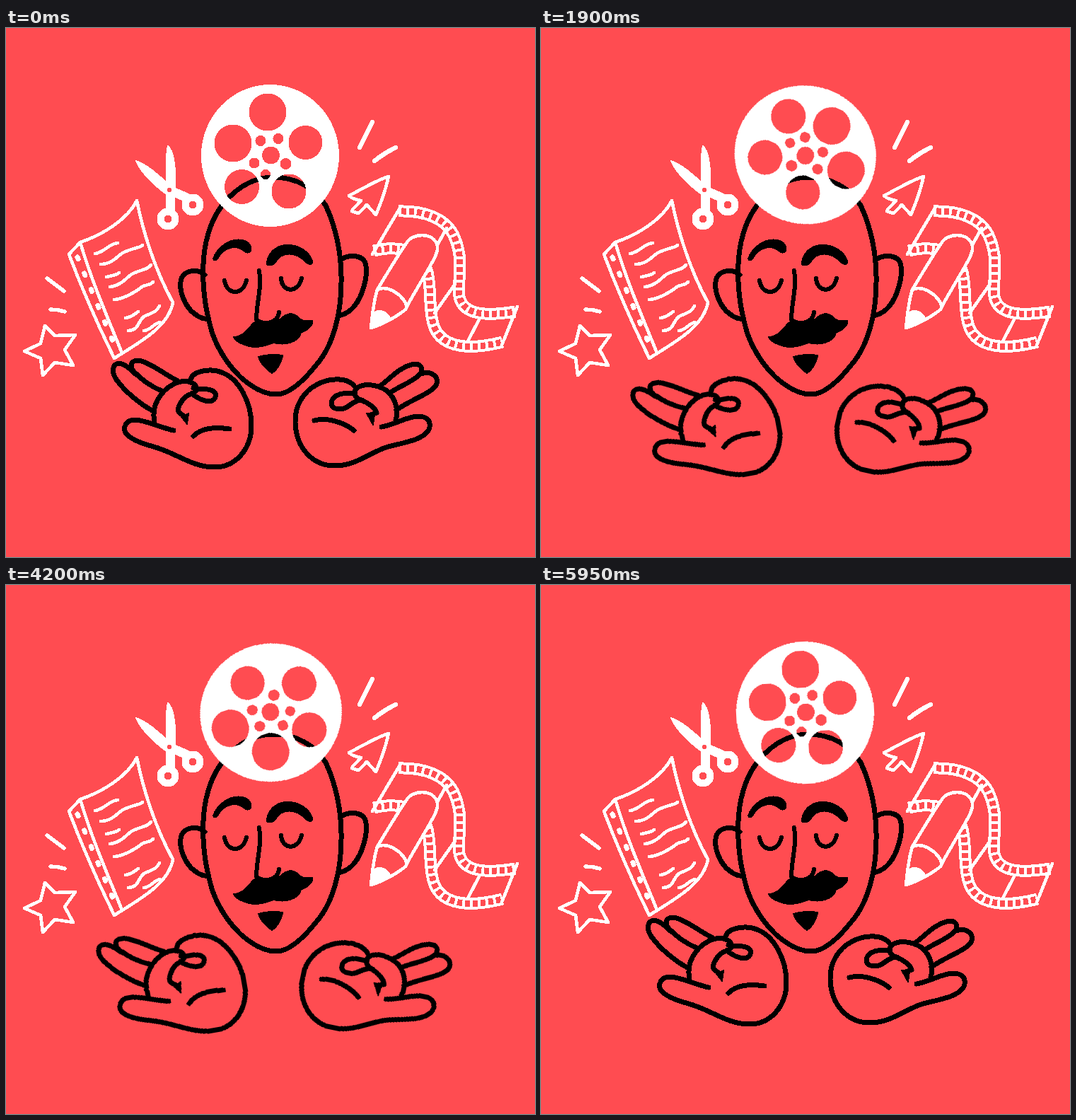
Write an HTML page that moves like this. It is 748x748 px and loops after 6000 ms.

```html
<!DOCTYPE html>
<html lang="en">
<head>
<meta charset="utf-8">
<title>Film maker in meditation</title>
<style>
  :root { --red: #ff4c51; --loop: 6000ms; }
  html, body { margin: 0; width: 100%; height: 100%; overflow: hidden; background: var(--red); }
  svg { display: block; width: 100vw; height: 100vh; shape-rendering: crispEdges; }

  .ink, .chalk { fill: none; stroke-linecap: round; stroke-linejoin: round; }
  .ink { stroke: #000; stroke-width: 7; }
  .chalk { stroke: #fff; stroke-width: 4.6; }
  .black { fill: #000; stroke-width: 2; }
  .white { fill: #fff; stroke-width: 2; }
  .red { fill: var(--red); }

  .band use { stroke-linecap: butt; }
  .band .edge { stroke: #fff; stroke-width: 17; }
  .band .gap { stroke: var(--red); stroke-width: 9; }
  .band .bars { stroke: #fff; stroke-width: 15; stroke-dasharray: 4 7; }

  .reel { transform-origin: 374px 180px; animation: spin var(--loop) steps(120) infinite; }
  .left, .right { animation: var(--loop) cubic-bezier(.33, 0, .67, 1) infinite; }
  .left { transform-origin: 233px 560px; animation-name: sink-left; }
  .right { transform-origin: 532px 552px; animation-name: sink-right; }

  @keyframes spin { to { transform: rotate(360deg); } }
  @keyframes sink-left {
    0%, 18.33%, 82.5%, 100% { transform: translate(0, 0) rotate(0deg); }
    34.17%, 66.67% { transform: translate(-9.5px, 23px) rotate(-11.2deg); }
  }
  @keyframes sink-right {
    0%, 18.33%, 82.5%, 100% { transform: translate(0, 0) rotate(0deg); }
    34.17%, 66.67% { transform: translate(10px, 25px) rotate(13.3deg); }
  }
</style>
</head>
<body>
<svg viewBox="0 0 748 748">
  <defs>
    <path id="upper" d="M555 259C590 258 624 268 635 298C646 325 641 350 640 370C640 404 670 409 720 401"/>
    <path id="lower" d="M520 315C550 308 585 310 596 345C602 370 597 400 606 424C618 452 655 456 702 444"/>
    <mask id="holes" maskUnits="userSpaceOnUse" x="260" y="70" width="230" height="230">
      <rect x="260" y="70" width="230" height="230" fill="#fff"/>
      <circle cx="370" cy="119" r="26.5"/>
      <circle cx="423.5" cy="162" r="24"/>
      <circle cx="400" cy="231" r="24.5"/>
      <circle cx="333.5" cy="224.5" r="24.5"/>
      <circle cx="321" cy="163" r="26.5"/>
      <circle cx="374.5" cy="180" r="12.5"/>
      <circle cx="360" cy="159.5" r="7.5"/>
      <circle cx="385" cy="156.5" r="7.5"/>
      <circle cx="395.5" cy="192" r="8"/>
      <circle cx="367" cy="207" r="7"/>
      <circle cx="351" cy="191" r="7.5"/>
    </mask>
  </defs>

  <rect class="red" width="748" height="748"/>

  <!-- face -->
  <g class="ink">
    <path d="M378 211C340 211 296 242 283 302C275 340 279 385 288 418C294 447 313 476 332 494C350 510 366 518 382 518C400 518 420 500 439 476C462 450 474 405 474 360C475 320 466 280 452 251C438 228 412 211 378 211Z"/>
    <path d="M281 349C272 341 254 341 248 354C243 372 254 396 268 405C276 411 281 412 286 411"/>
    <path d="M473 328C482 321 502 319 508 332C513 350 504 380 492 394C486 401 480 404 474 406"/>
    <path d="M309 357C312 378 335 379 340 357M389 354C390 374 413 376 418 354" stroke-width="6"/>
    <path d="M358 343C362 368 354 390 354 412C362 421 385 418 386 402" stroke-width="6"/>
    <g class="black">
      <path d="M293 326C300 308 318 297 334 300C344 302 348 309 346 315C344 319 339 318 335 314C325 307 312 310 303 320C299 328 294 331 293 326Z"/>
      <path d="M369 331C371 318 382 307 398 307C415 307 428 316 433 329C434 336 428 335 424 331C414 320 400 316 388 323C382 328 380 335 375 335C371 336 368 335 369 331Z"/>
      <path d="M322 437C332 437 340 430 348 419C354 412 362 414 372 418C380 418 386 414 392 408C400 403 408 403 414 410C420 416 426 414 433 414C434 421 426 427 417 431C413 445 395 449 378 445C366 450 352 453 340 449C332 446 324 443 322 437Z"/>
      <path d="M357 465C366 462 380 461 391 463C390 472 383 484 376 488C369 484 360 474 357 465Z"/>
    </g>
  </g>

  <!-- hands -->
  <g class="ink left">
    <path d="M261 497C265 484 290 481 305 487C330 496 347 530 347 562C347 595 325 621 295 621C265 621 245 604 215 594C195 588 180 584 170 574C164 565 170 554 182 554C200 555 218 565 237 569"/>
    <path d="M207 541C190 532 168 514 156 497C146 481 154 472 164 475C172 478 178 484 184 490"/>
    <path d="M222 514C205 507 190 496 180 485C172 473 182 468 192 471C210 477 226 491 243 499"/>
    <path d="M210 556C205 535 218 513 238 503C250 497 264 499 269 507C272 515 262 517 256 520C248 526 242 536 244 543L252 549"/>
    <path d="M265 509C274 511 284 510 290 512C300 515 298 526 288 528C278 528 270 522 262 517"/>
    <path class="black" d="M248 550L258 545L256 560Z"/>
    <path d="M265 577C276 566 296 564 316 567"/>
  </g>
  <g class="ink right">
    <path d="M493 507C484 494 458 494 440 504C420 514 408 535 409 558C410 592 432 619 465 619C495 619 515 600 540 592C565 586 590 582 598 568C602 556 596 549 582 549C565 550 550 561 531 564"/>
    <path d="M528 507C544 495 555 481 573 476C585 473 592 480 585 490C575 500 558 506 544 515"/>
    <path d="M587 489C600 484 612 492 609 503C604 516 575 524 552 540"/>
    <path d="M551 554C556 540 550 524 540 514C528 505 512 503 502 506C490 510 490 522 502 526C512 530 522 537 524 544L516 547"/>
    <path d="M490 516C478 516 462 517 460 530C460 540 474 541 482 536C490 531 495 526 503 526"/>
    <path class="black" d="M510 545L521 547L519 561Z"/>
    <path d="M436 555C455 550 478 558 492 569"/>
  </g>

  <!-- script page -->
  <g class="chalk">
    <path d="M105 303C138 292 172 270 185 244C194 290 212 345 236 388C230 422 190 444 153 467C130 420 108 370 89 320L105 303C120 355 143 408 163 457"/>
    <path d="M126 319C140 317 145 305 158 304M134 334C150 334 158 322 165 318C180 310 188 312 193 307M142 352C150 350 155 350 160 346M147 366C165 364 172 350 180 347C190 342 200 342 205 335M153 384C165 384 185 372 192 366C200 362 204 364 208 359M169 410C178 409 182 404 187 401M173 428C190 427 186 412 197 407S212 402 217 393M195 428C205 427 208 419 217 416"/>
    <path d="M101 324L152 445" stroke-width="7" stroke-dasharray="3 21.8"/>
  </g>

  <!-- scissors -->
  <g class="chalk">
    <path class="white" d="M184 188C197 192 217 208 232 224L227 235C212 224 193 208 184 188Z"/>
    <path class="white" d="M229 167C238 175 240 200 239 228L226 226C229 205 225 180 229 167Z"/>
    <path d="M232 231L233 256M235 231L256 240" stroke-width="13"/>
    <circle class="red" cx="229" cy="270" r="10.5" stroke-width="10"/>
    <circle class="red" cx="264" cy="250" r="10.5" stroke-width="10"/>
    <circle class="red" cx="231" cy="229" r="3" stroke="none"/>
  </g>

  <!-- star, pointer, sparks -->
  <g class="chalk">
    <path d="M55 421L69 435L98 434L83 455L95 477L69 473L52 491L49 467L26 457L49 446Z"/>
    <path d="M541 210C526 214 505 227 485 237C490 242 496 243 502 244C497 250 490 255 489 259L498 262C504 258 507 253 510 250L523 264C530 248 537 228 541 210Z"/>
    <path d="M58 354L82 372M63 398Q73 398 83 401" stroke-width="5.5"/>
    <path d="M518 133L500 169M551 169Q536 176 521 188" stroke-width="6.5"/>
  </g>

  <!-- film strip -->
  <g class="chalk">
    <g class="band">
      <use href="#upper" class="edge"/><use href="#upper" class="gap"/><use href="#upper" class="bars"/>
    </g>
    <g class="band">
      <use href="#lower" class="edge"/><use href="#lower" class="gap"/><use href="#lower" class="bars"/>
    </g>
    <path d="M558 253L518 320M723 394L700 451M623 283L606 314M635 362L606 403M669 412L653 443"/>
  </g>

  <!-- pencil -->
  <g class="chalk">
    <path class="red" d="M567 303C575 290 605 288 610 308C612 320 600 335 570 388L565 398C550 410 530 420 516 424C518 405 520 385 525 370C540 345 555 320 567 303Z" stroke-width="4.6" style="stroke-width:4.6"/>
    <path d="M525 370C541 363 562 378 567 394"/>
    <path class="white" d="M516 424L521 402C530 397 540 402 543 411C535 418 525 422 516 424Z"/>
  </g>

  <!-- reel -->
  <g class="reel">
    <ellipse cx="373.5" cy="180.5" rx="97.5" ry="100.5" fill="#fff" mask="url(#holes)"/>
  </g>
</svg>
</body>
</html>
```
